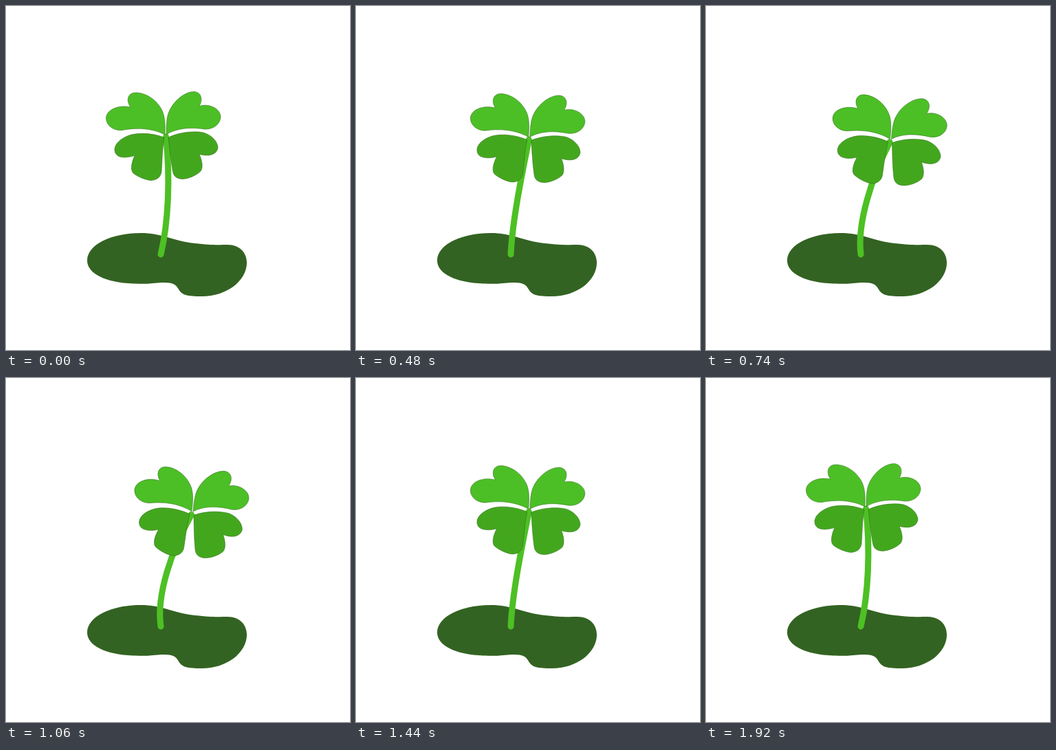
An HTML page for the animation above (1940 ms loop, 500 by 500 pixels).

```html
<!DOCTYPE html>
<html lang="en">
<head>
<meta charset="utf-8">
<title>Swaying clover</title>
<style>
  html, body { margin: 0; width: 100%; height: 100%; overflow: hidden; background: #fff; }
  svg { display: block; width: 100%; height: 100%; }
  .leaf { stroke: #2a6414; stroke-width: .5; }
  .upper { fill: #4cbf26; }
  .lower { fill: #43a71e; }
  .stem { fill: none; stroke: #4dc024; stroke-width: 9; stroke-linecap: round; }
</style>
</head>
<body>
<svg viewBox="0 0 500 500">
  <path fill="#336322" d="M118 370C118 346 155 330 195 330C228 330 240 341 275 345C300 348 310 347 322 347C340 347 350 359 350 373C350 400 320 422 285 422C262 422 256 420 251 412C246 403 240 401 220 402.5C205 404 200 404 185 403.5C145 402 118 389 118 370Z"/>
  <path class="stem" id="stem"/>
  <path class="leaf lower" id="lowerLeft" d="M230 191C212 184 190 184 179 188C165 193 157 202 158 210C159 221 173 222 187 217.5C183 226 180 238 185 243C191 248 204 253.5 211 253.5C220 253 225 248 226 241C227 228 227 209 230 191Z"/>
  <path class="leaf lower" id="lowerRight" d="M236 191C250 184 272 181 287 184C300 188 308 198 308 206C306 217 294 219 281 215.5C285 224 287 235 283 240C276 247 264 251.5 256 251.5C246 251 243 246 242 238C239 222 238 207 236 191Z"/>
  <path class="leaf upper" id="upperLeft" d="M231 187C231.5 175 231.5 162 227 152C219 135 201 125 187 126C177 127 174 137 181 147C163 143 145 151 145.5 164C146 174 157 182 169 180.5C185 177.5 209 176 231 187Z"/>
  <path class="leaf upper" id="upperRight" d="M233 187C233 177 233 164 236 156C243 137 261 124 274 124.5C285 126 286 137 281 145.5C295 141 312 149 312 161.5C311 173 300 180 288 179C270 176 248 177 233 187Z"/>
</svg>
<script>
  const LOOP = 1940, HALF = 960;
  const byId = id => document.getElementById(id);
  const stem = byId('stem');

  // Shift and turn of each leaf at full sway
  const leaves = [
    ['upperLeft', 39.3, 7, 5.3],
    ['upperRight', 39.3, 7, 5.3],
    ['lowerLeft', 37.7, 7, 5.3],
    ['lowerRight', 37.5, 8.3, 4.9]
  ].map(([id, dx, dy, turn]) => ({ el: byId(id), dx, dy, turn }));

  const mix = (a, b, p) => a + (b - a) * p;
  const easeInOut = u => u < .5
    ? .5 * (2 * u) ** 2.4
    : 1 - .5 * (2 - 2 * u) ** 2.4;

  function sway(time) {
    const u = Math.max(0, 1 - Math.abs(time - HALF) / HALF);
    return easeInOut(u);
  }

  function draw(time) {
    const p = sway(time);
    for (const { el, dx, dy, turn } of leaves) {
      el.setAttribute('transform',
        `translate(${dx * p} ${dy * p}) rotate(${turn * p} 232 188)`);
    }
    stem.setAttribute('d', `M225 361C${mix(236, 218, p)} 315 ` +
      `${mix(239, 241, p)} 250 ${mix(232.5, 270, p)} ${mix(190, 198.5, p)}`);
  }

  let start;
  function tick(now) {
    start ??= now;
    draw((now - start) % LOOP);
    requestAnimationFrame(tick);
  }
  draw(0);
  requestAnimationFrame(tick);
</script>
</body>
</html>
```
